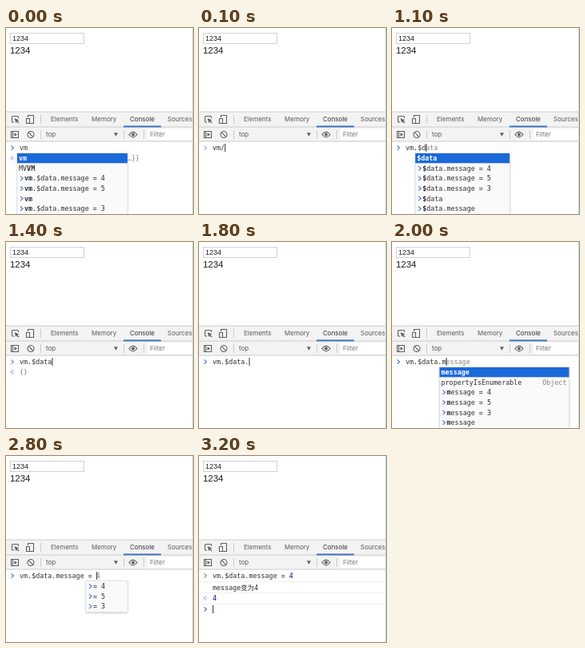
An HTML page that plays this animation: 234 by 233 pixels, repeating every 3.3 s.

```html
<!DOCTYPE html>
<html lang="en">
<head>
<meta charset="utf-8">
<title>Console session</title>
<style>
html, body { margin: 0; width: 100%; height: 100%; overflow: hidden; background: #fff; }
svg { display: block; width: 234px; height: 233px; }
text { white-space: pre; }
.page { font-family: "Liberation Sans", Arial, sans-serif; fill: #1c1c1c; }
.ui { font: 8px Inter, sans-serif; fill: #5a5a5a; }
.ui .active { fill: #333; }
.ui .hint { fill: #757575; }
.mono { font: 8.4px "DejaVu Sans Mono", "Noto Sans CJK SC", monospace; fill: #303030; }
.mono .ghost, .mono.ghost { fill: #858585; }
.mono .number { fill: #1c08c4; }
.mono .picked { fill: #fff; }
.bold { font-weight: bold; }
.icon { fill: none; stroke: #5f5f5f; stroke-width: 1.1; }
.solid { fill: #5f5f5f; }
.rule { stroke: #ccc; stroke-width: 1; }
.chevron { fill: none; stroke: #4476d8; stroke-width: 1.1; }
.chevron.dim { stroke: #85858f; }
.chevron.pale { stroke: #a9a9d8; }
.chevron.fresh { stroke: #5c5cc8; }
.dot { fill: #a9a9d8; }
</style>
</head>
<body>
<svg viewBox="0 0 234 233">
  <defs>
    <filter id="shadow" x="-10%" y="-10%" width="120%" height="120%">
      <feDropShadow dx="0" dy="0.7" stdDeviation="1" flood-opacity=".28"/>
    </filter>
  </defs>

  <rect x="5.5" y="6.5" width="92" height="13" fill="#fff" stroke="#d2d2d2"/>
  <text class="page" x="8" y="16.3" font-size="9">1234</text>
  <text class="page" x="5" y="32.3" font-size="11.4">1234</text>

  <rect y="105" width="234" height="37" fill="#f3f3f3"/>
  <path class="rule" d="M0 105H234M0 124H234M0 142H234M43.5 109V120M43.5 128V139M147.5 128V139M172.5 128V139"/>
  <rect x="147" y="122.4" width="47" height="2" fill="#3f73c4"/>

  <path class="icon" d="M10 118H8.5Q7.5 118 7.5 117V111.5Q7.5 110.5 8.5 110.5H14.5Q15.5 110.5 15.5 111.5V113"/>
  <path class="solid" d="M10.5 113L16.5 115.5L14.2 116.3L16.5 118.6L15.6 119.5L13.3 117.2L12.5 119.3Z"/>
  <path class="icon" d="M27.5 112V109.5H34.5V119.5H30M25.5 113.5H29.5V119.5H25.5Z"/>
  <path class="icon" d="M6.5 129.5H15.5V137.5H6.5ZM8.5 129.5V137.5"/>
  <path class="solid" d="M10.5 131.2L14 133.5L10.5 135.8Z"/>
  <circle class="icon" cx="31" cy="133.5" r="4"/>
  <path class="icon" d="M28.2 130.7L33.8 136.3"/>
  <path class="solid" d="M135 131.3H140L137.5 135.7Z"/>
  <path class="icon" d="M153.9 133.5Q159 126.8 164.1 133.5Q159 140.2 153.9 133.5Z"/>
  <circle class="solid" cx="159" cy="133.5" r="2"/>
  <rect x="177" y="126" width="57" height="14" fill="#fff"/>
  <g class="ui">
    <text x="56" y="117.4">Elements</text>
    <text x="107" y="117.4">Memory</text>
    <text x="155" y="117.4" class="active">Console</text>
    <text x="202" y="117.4">Sources</text>
    <text x="50" y="136.4">top</text>
    <text x="180" y="136.4" class="hint">Filter</text>
  </g>

  <g id="console"></g>
  <path d="M233.5 0V233" stroke="#c6e2e0"/>
</svg>

<script>
const LOOP = 3300, CHAR = 5.06, LEFT = 17, BASE = 153, ROW = 12.6;

const span = (cls, s) => `<tspan class="${cls}">${s}</tspan>`;
const bold = s => span("bold", s);
const text = (x, y, s, cls = "") => `<text class="mono ${cls}" x="${x}" y="${y}">${s}</text>`;
const chevron = (x, y, cls = "", dir = 1) =>
  `<path class="chevron ${cls}" d="M${x - 1.5 * dir} ${y - 2.7}L${x + 1.5 * dir} ${y}L${x - 1.5 * dir} ${y + 2.7}"/>`;
const returned = y => chevron(7.5, y, "pale", -1) + `<circle class="dot" cx="10" cy="${y}" r=".7"/>`;
const answer = (y, s) => returned(y) + text(LEFT, y + 3, s);
const cursor = (chars, y = 150) =>
  `<rect x="${LEFT + chars * CHAR}" y="${y - 5}" width="1" height="10" fill="#333"/>`;

function prompt(typed, { caret = true, ghost = "", arrow = "" } = {}) {
  return chevron(8, 150, arrow) + text(LEFT, BASE, typed + span("ghost", ghost)) +
    (caret ? cursor(typed.length) : "");
}

// Rows starting with ">" come from the history; "|" splits off a right-hand note.
function popup(column, width, rows, picked = true) {
  const x = 14 + column * CHAR, top = 156.5;
  let out = `<rect x="${x}" y="${top}" width="${width}" height="${rows.length * ROW + 1.2}"
    fill="#fafafa" stroke="#d6d6d6" stroke-width=".5" filter="url(#shadow)"/>`;
  if (picked) out += `<rect x="${x}" y="157" width="${width}" height="12.3" fill="#1a69d8"/>`;
  rows.forEach((row, i) => {
    const y = 163.2 + i * ROW, past = row[0] === ">";
    const [label, note] = (past ? row.slice(1) : row).split("|");
    if (past) out += chevron(x + 5.5, y);
    out += text(x + (past ? 9 : 2), y + 3, picked && !i ? span("picked bold", label) : label);
    if (note) out += text(x + width - 3 - note.length * CHAR, y + 3, note, "ghost");
  });
  return out;
}

const vm = bold("vm"), m = bold("m"), dollar = bold("$");
const vmPopup = returned(163) + text(152, 166, "…}}", "ghost") +
  popup(0, 138, ["vm", "MV" + bold("VM"), `>${vm}.$data.message = 4`,
    `>${vm}.$data.message = 5`, `>${vm}`, `>${vm}.$data.message = 3`]);
const dataPopup = popup(3, 118, ["$data", `>${dollar}data.message = 4`,
  `>${dollar}data.message = 5`, `>${dollar}data.message = 3`, `>${dollar}data`, `>${dollar}data.message`]);
const memberPopup = popup(9, 162, ["message", "constructor|Object", "hasOwnProperty|Object",
  "isPrototypeOf|Object", "propertyIsEnumerable|Object", "toString|Object"]);
const messagePopup = popup(9, 162, ["message", "propertyIsEnumerable|Object",
  `>${m}essage = 4`, `>${m}essage = 5`, `>${m}essage = 3`, `>${m}essage`]);
const valuePopup = popup(17, 52, [">= 4", ">= 5", ">= 3", ">=4"], false);
const empty = answer(163, span("ghost", "{}"));

const done = '<path d="M0 157.5H234M0 171.5H234M0 185.5H234" stroke="#f0f0f0"/>' +
  prompt("vm.$data.message = " + span("number", "4"), { caret: false, arrow: "dim" }) +
  text(LEFT, 167.5, "message变为4") + answer(178, span("number", "4")) + chevron(8, 192, "fresh");

const states = [
  [0, prompt("vm", { caret: false }) + vmPopup],
  [100, prompt("vm/", { arrow: "pale" })],
  [400, prompt("vm")],
  [500, prompt("vm") + vmPopup],
  [700, prompt("vm", { caret: false }) + vmPopup],
  [900, prompt("vm.")],
  [1000, prompt("vm.$", { ghost: "data" }) + dataPopup],
  [1100, prompt("vm.$d", { ghost: "ata" }) + dataPopup],
  [1400, prompt("vm.$data", { arrow: "dim" }) + empty],
  [1600, prompt("vm.$data", { caret: false, arrow: "dim" }) + empty],
  [1800, prompt("vm.$data.")],
  [1900, prompt("vm.$data.", { ghost: "message" }) + memberPopup],
  [2000, prompt("vm.$data.m", { ghost: "essage" }) + messagePopup],
  [2200, prompt("vm.$data.message")],
  [2400, prompt("vm.$data.message ")],
  [2500, prompt("vm.$data.message ") + valuePopup],
  [2700, prompt("vm.$data.message =", { ghost: " 4" }) + valuePopup],
  [2800, prompt("vm.$data.message = ", { ghost: "4" }) + popup(17, 52, [">= 4", ">= 5", ">= 3"], false)],
  [2900, prompt("vm.$data.message = 4")],
  [3100, done],
  [3200, done + cursor(0, 192)]
];

const view = document.getElementById("console");
let shown;
function draw() {
  const now = performance.now() % LOOP;
  const state = states.findLast(([start]) => start <= now);
  if (state !== shown) {
    view.innerHTML = state[1];
    shown = state;
  }
  requestAnimationFrame(draw);
}
draw();
</script>
</body>
</html>
```
